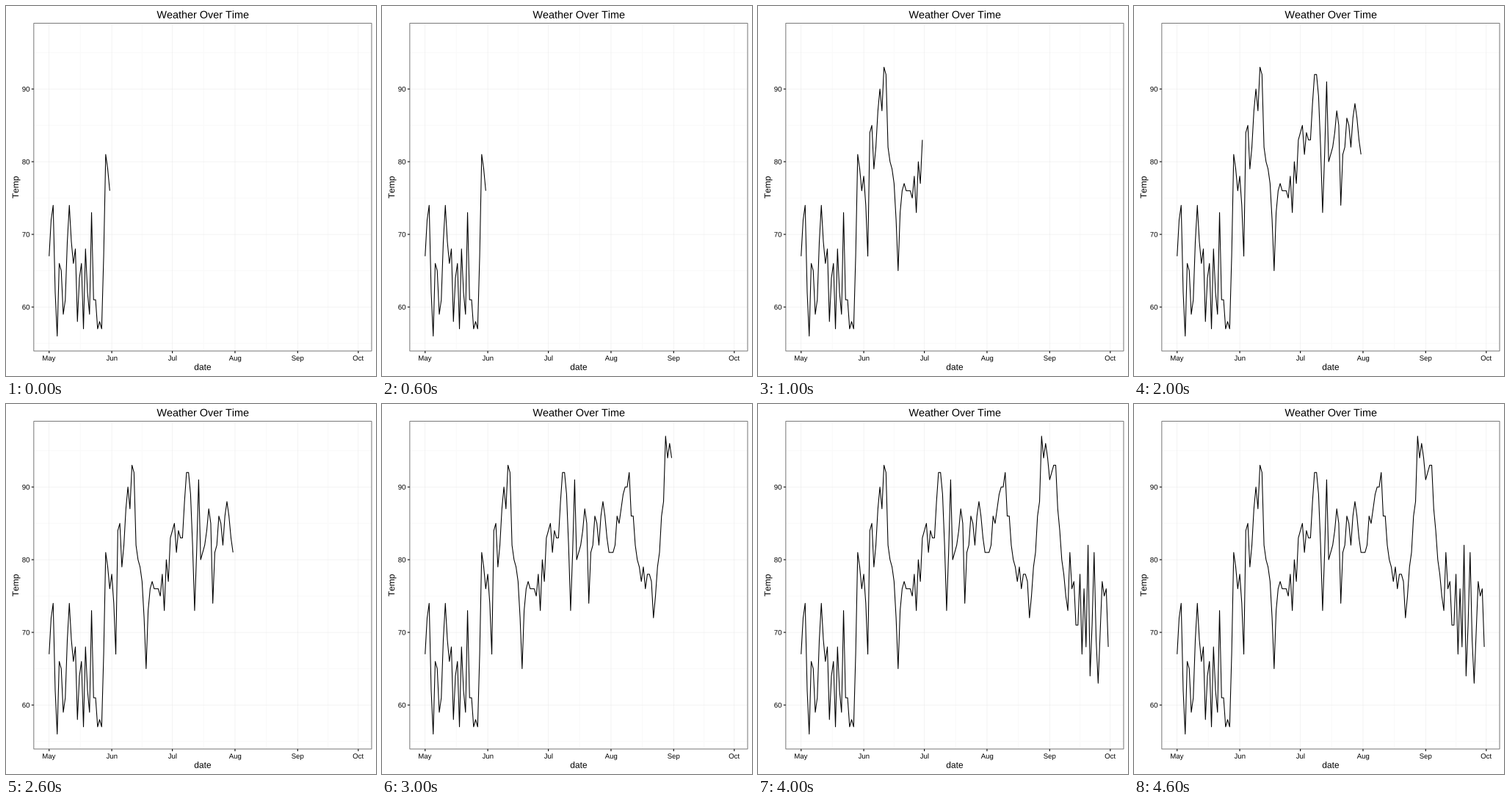
Animation of 504 by 504 pixels, one loop 5 s. Source, as a matplotlib script:

```python
import numpy as np
import matplotlib.pyplot as plt
from matplotlib.animation import FuncAnimation
from matplotlib.patches import PathPatch, Rectangle
from matplotlib.textpath import TextPath
from matplotlib.transforms import Affine2D

plt.rcParams.update({
    "toolbar": "None",
    "font.family": "Liberation Sans",
    "text.kerning_factor": 6,  # plain advances, no pair kerning
    "path.simplify": False,
})

SIZE, DPI = 504, 72  # at 72 dpi one point is one pixel
LEFT, RIGHT, TOP, BOTTOM = 37.82, 498.02, 23.49, 469.96
STROKE, HAIR, TICK = 1.07, 0.43, 3

# Daily temperatures
MAY = [67, 72, 74, 62, 56, 66, 65, 59, 61, 69, 74, 69, 66, 68, 58, 64,
       66, 57, 68, 62, 59, 73, 61, 61, 57, 58, 57, 67, 81, 79, 76]
JUN = [78, 74, 67, 84, 85, 79, 82, 87, 90, 87, 93, 92, 82, 80, 79,
       77, 72, 65, 73, 76, 77, 76, 76, 76, 75, 78, 73, 80, 77, 83]
JUL = [84, 85, 81, 84, 83, 83, 88, 92, 92, 89, 82, 73, 81, 91, 80, 81,
       82, 84, 87, 85, 74, 81, 82, 86, 85, 82, 86, 88, 86, 83, 81]
AUG = [81, 81, 82, 86, 85, 87, 89, 90, 90, 92, 86, 86, 82, 80, 79, 77,
       79, 76, 78, 78, 77, 72, 75, 79, 81, 86, 88, 97, 94, 96, 94]
SEP = [91, 92, 93, 93, 87, 84, 80, 78, 75, 73, 81, 76, 77, 71, 71,
       78, 67, 76, 68, 82, 64, 71, 81, 69, 63, 70, 77, 75, 76, 68]

months = [MAY, JUN, JUL, AUG, SEP]
ends = np.cumsum([len(m) for m in months])
starts = np.append(0, ends)
temps = np.concatenate(months)
days = np.arange(len(temps))


def scale(values, lo, hi, a, b):
    """Map data to pixels, leaving 5 % of the range free at both ends."""
    pad = 0.05 * (hi - lo)
    return a + (values - lo + pad) / (hi - lo + 2 * pad) * (b - a)


def to_x(day):
    return scale(day, days[0], days[-1], LEFT, RIGHT)


def to_y(temp):
    return scale(temp, temps.min(), temps.max(), BOTTOM, TOP)


fig = plt.figure(figsize=(SIZE / DPI, SIZE / DPI), dpi=DPI, facecolor="white")
ax = fig.add_axes([0, 0, 1, 1])
ax.set(xlim=(0, SIZE), ylim=(SIZE, 0))
ax.axis("off")


def segment(x, y, color, width, z):
    ax.plot(x, y, color=color, lw=width, zorder=z, snap=False,
            solid_capstyle="butt")


def label(text, x, y, size, align=0.5, turn=0):
    """Text with its baseline at y; align is 0 left, 0.5 centre, 1 right."""
    path = TextPath((0, 0), text, size=size)
    box = path.get_extents()
    anchor = box.x0 + align * box.width
    place = (Affine2D().translate(-anchor, 0).scale(1, -1)
             .rotate_deg(-turn).translate(x, y))
    ax.add_patch(PathPatch(place.transform_path(path), fc="black", lw=0,
                           zorder=6, snap=False))


def grid(xs, ys, color, width, z):
    for x in xs:
        segment([x, x], [TOP, BOTTOM], color, width, z)
    for y in ys:
        segment([LEFT, RIGHT], [y, y], color, width, z)


x_ticks = to_x(starts)
y_values = np.arange(60, 91, 10)
y_ticks = to_y(y_values)

grid((x_ticks[1:] + x_ticks[:-1]) / 2, to_y(np.arange(55, 96, 10)),
     "#fafafa", STROKE, 1)
grid(x_ticks, y_ticks, "#e5e5e5", HAIR, 2)
ax.add_patch(Rectangle((LEFT, TOP), RIGHT - LEFT, BOTTOM - TOP, fill=False,
                       ec="#7f7f7f", lw=STROKE, zorder=4, snap=False))

for x, name in zip(x_ticks, ["May", "Jun", "Jul", "Aug", "Sep", "Oct"]):
    segment([x, x], [BOTTOM, BOTTOM + TICK], "black", STROKE, 5)
    label(name, x, 482.9, 9.6)
for y, value in zip(y_ticks, y_values):
    segment([LEFT - TICK, LEFT], [y, y], "black", STROKE, 5)
    label(str(value), 32.1, y + 3.45, 9.6, align=1)

label("Weather Over Time", (LEFT + RIGHT) / 2, 16.7, 14.4)
label("date", (LEFT + RIGHT) / 2, 495.8, 12)
label("Temp", 17, (TOP + BOTTOM) / 2 + 0.3, 12, turn=90)

curve, = ax.plot([], [], color="black", lw=STROKE, zorder=3, snap=False,
                 solid_joinstyle="round", solid_capstyle="butt")


def update(month):
    n = ends[month]
    curve.set_data(to_x(days[:n]), to_y(temps[:n]))
    return curve,


anim = FuncAnimation(fig, update, frames=len(months), interval=1000,
                     repeat=True, repeat_delay=0)
plt.show()
```
